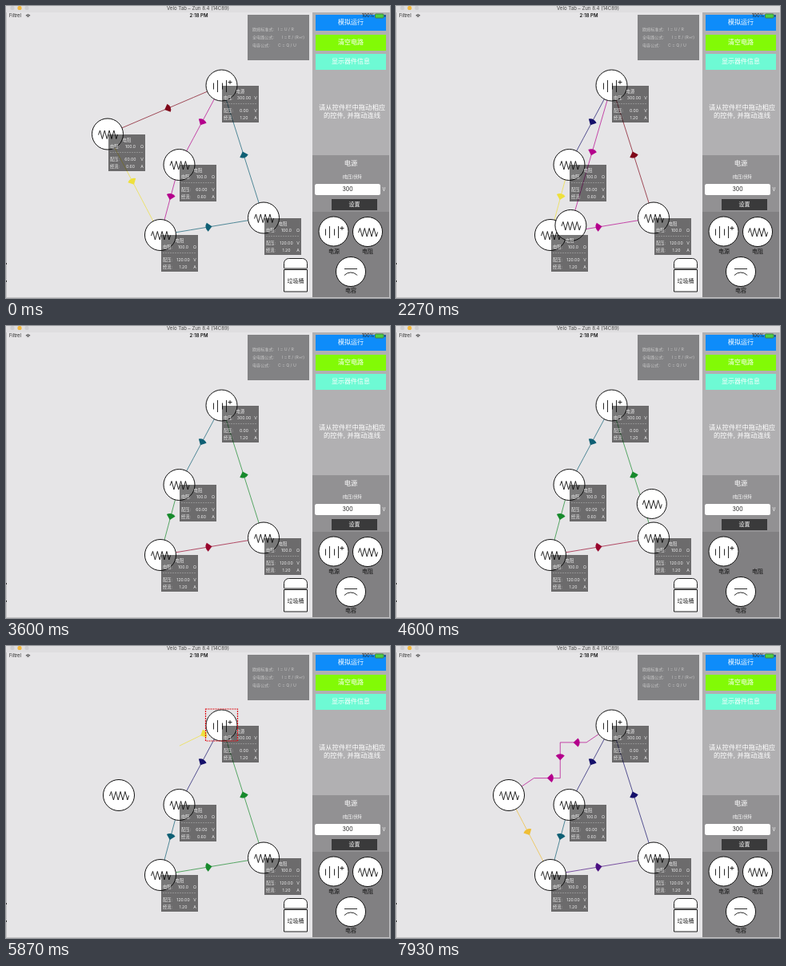
An HTML page with a canvas that plays this animation: 480x366 px, repeating every 8 s.

```html
<!DOCTYPE html>
<html lang="zh">
<head>
<meta charset="utf-8">
<title>Circuit board</title>
<style>
html, body { margin: 0; width: 100%; height: 100%; overflow: hidden; background: #e6e5e7; }
canvas { display: block; width: 480px; height: 366px; }
</style>
</head>
<body>
<canvas id="stage"></canvas>
<script>
const LOOP = 8000;
const FONT = 'Inter, "Noto Sans CJK SC", "Noto Sans CJK", sans-serif';
const canvas = document.getElementById('stage');
const ctx = canvas.getContext('2d');
const scale = window.devicePixelRatio || 1;
canvas.width = 480 * scale;
canvas.height = 366 * scale;

const C = {
  teal: '#0f5f74', magenta: '#b4008c', yellow: '#eee03c', maroon: '#80081a',
  lime: '#a8c814', green: '#178a2c', crimson: '#98062c', navy: '#15106a',
  purple: '#4a1082', sea: '#12907e', amber: '#efbe36'
};
const hues = Object.values(C);

const cell = { x: 269.5, y: 99.5, kind: 'cell', info: ['电源', '电压:', '300.00', 'V', '0.00', '1.20'] };
const resistor = (x, y, volts, amps) =>
  ({ x, y, kind: 'resistor', info: ['电阻', '电阻:', '100.0', 'Ω', volts, amps] });
const left = resistor(127, 160.5, '60.00', '0.60');
const mid = resistor(216.5, 199, '60.00', '0.60');
const low = resistor(193, 287, '120.00', '1.20');
const right = resistor(322, 265.5, '120.00', '1.20');
const HOME = { x: 452, y: 283 };
const DROP = { x: 141, y: 187 };

// Start time, then colours of cell-right, right-low, low-mid, mid-cell, low-loose, loose-cell
const phases = [
  [0, 'teal teal magenta magenta yellow maroon'],
  [2660, 'teal lime magenta green magenta magenta'],
  [2870, 'green crimson green teal'],
  [5600, 'green green teal navy'],
  [6370, 'maroon navy purple sea amber magenta'],
  [7500, 'navy purple teal navy amber magenta']
];
const oldPath = [[1700, left.x, left.y], [1900, 114, 176], [2200, 190, 262], [2600, 350, 335]];
const newPath = [[3870, HOME.x, HOME.y], [4600, 320, 223], [5400, DROP.x, DROP.y]];
const wirePath = [[5640, cell.x, cell.y], [5870, 217, 125], [6370, DROP.x, DROP.y]];
const nextPath = [[6750, DROP.x, DROP.y], [7500, low.x, low.y]];

const during = (t, a, b) => t >= a && t < b;
const mix = (a, b, k) => a + (b - a) * k;
const noise = n => { const v = Math.sin(n * 127.1) * 43758.5453; return v - Math.floor(v); };

function along(path, t) {
  let i = 0;
  while (i < path.length - 2 && t > path[i + 1][0]) i++;
  const a = path[i], b = path[i + 1];
  const k = Math.min(1, Math.max(0, (t - a[0]) / (b[0] - a[0])));
  return { x: mix(a[1], b[1], k), y: mix(a[2], b[2], k) };
}

function text(str, x, y, size, color, align = 'center', weight = 400) {
  ctx.font = `${weight} ${size}px ${FONT}`;
  ctx.fillStyle = color;
  ctx.textAlign = align;
  ctx.textBaseline = 'middle';
  ctx.fillText(str, x, y);
}

function rect(x, y, w, h, color) {
  ctx.fillStyle = color;
  ctx.fillRect(x, y, w, h);
}

function round(x, y, w, h, r, fill, stroke) {
  ctx.beginPath();
  ctx.roundRect(x, y, w, h, r);
  ctx.fillStyle = fill;
  ctx.fill();
  if (stroke) { ctx.strokeStyle = stroke; ctx.lineWidth = 1; ctx.stroke(); }
}

function line(points, color = '#111', width = 0.9) {
  ctx.beginPath();
  points.forEach(([x, y]) => ctx.lineTo(x, y));
  ctx.strokeStyle = color;
  ctx.lineWidth = width;
  ctx.stroke();
}

function disc(x, y, r, color) {
  ctx.beginPath();
  ctx.arc(x, y, r, 0, 7);
  ctx.fillStyle = color;
  ctx.fill();
}

const glyphs = {
  cell() {
    [-10, -5, 1, 6].forEach((x, i) => {
      const h = i % 2 ? 7.5 : 4;
      line([[x, 1 - h], [x, 1 + h]]);
    });
    line([[8, -4], [13, -4]]);
    line([[10.5, -6.5], [10.5, -1.5]]);
  },
  resistor() {
    const points = [[-11.5, 1]];
    for (let i = 0; i < 8; i++) points.push([-9.5 + i * 2.9, i % 2 ? 6 : -4.5]);
    line([...points, [12.5, 0.5]]);
  },
  capacitor() {
    line([[-8, -3.5], [8, -3.5]]);
    ctx.beginPath();
    ctx.arc(0, 12, 11, -2.4, -0.74);
    ctx.stroke();
  }
};

function part(x, y, kind, r = 19.5) {
  ctx.save();
  ctx.translate(x, y);
  disc(0, 0, r, '#fff');
  ctx.strokeStyle = '#111';
  ctx.lineWidth = 1;
  ctx.stroke();
  glyphs[kind]();
  ctx.restore();
}

function infoBox({ x, y, info }) {
  const [name, label, value, unit, volts, amps] = info;
  ctx.save();
  ctx.translate(Math.round(x + 0.5), Math.round(y));
  rect(0, 0, 46, 46, 'rgba(0,0,0,.53)');
  text(name, 23, 7.5, 5.4, '#eee');
  const row = (a, b, c, dy) => {
    text(a, 2, dy, 5.2, '#eee', 'left');
    text(b, 27.5, dy, 5.2, '#eee');
    text(c, 42, dy, 5.2, '#eee');
  };
  row(label, value, unit, 15);
  ctx.setLineDash([2, 1]);
  line([[2, 22.5], [44, 22.5]], '#aaa', 0.6);
  ctx.setLineDash([]);
  row('配压:', volts, 'V', 31.5);
  row('经流:', amps, 'A', 40);
  ctx.restore();
}

// Sector with its tip halfway, opening towards b
function fan([ax, ay], [bx, by], color) {
  const x = (ax + bx) / 2, y = (ay + by) / 2;
  const turn = Math.atan2(by - ay, bx - ax);
  ctx.beginPath();
  ctx.moveTo(x, y);
  ctx.arc(x, y, 8, turn - 0.76, turn + 0.76);
  ctx.closePath();
  ctx.fillStyle = color;
  ctx.fill();
}

// Straight when nearly level or upright, otherwise stepped; both ends have a fan under the part
function wire(a, b, color) {
  const dx = b.x - a.x, dy = b.y - a.y;
  const len = Math.hypot(dx, dy) || 1;
  const ux = dx / len * 38, uy = dy / len * 38;
  const start = [a.x, a.y], end = [b.x, b.y];
  const first = [a.x + ux, a.y + uy], last = [b.x - ux, b.y - uy];
  const mx = (a.x + b.x) / 2;
  const stepped = Math.min(Math.abs(dx), Math.abs(dy)) >= 75;
  const run = stepped ? [first, [mx, first[1]], [mx, last[1]], last] : [first, last];
  line([start, ...run, end], color, 0.7);
  fan(first, start, color);
  fan(last, end, color);
  for (let i = 1; i < run.length; i++) fan(run[i - 1], run[i], color);
}

function dragWire(from, to) {
  line([[from.x, from.y], [to.x, to.y]], C.yellow, 0.7);
  if (Math.hypot(to.x - from.x, to.y - from.y) > 16) fan([to.x, to.y], [from.x, from.y], C.yellow);
}

function highlight({ x, y }) {
  ctx.setLineDash([2, 1]);
  ctx.strokeStyle = '#e01018';
  ctx.lineWidth = 1.2;
  ctx.strokeRect(x - 20, y - 20.5, 40, 40);
  ctx.setLineDash([]);
}

function bin(open) {
  ctx.save();
  ctx.translate(362, 323 + open * 2);
  ctx.rotate(open * 0.22);
  round(-14.5, -6.5, 29, 12.5, [6, 6, 1, 1], '#fff', '#222');
  ctx.restore();
  round(347.5, 330.5, 29, 27.5, 0, '#fff', '#222');
  text('垃圾桶', 362, 344.5, 7, '#222');
}

function chrome() {
  rect(0, 0, 480, 366, '#c4c3c5');
  rect(1, 8, 478, 357, '#e6e5e7');
  rect(0, 0, 480, 8, '#dfdee0');
  ['#cfced0', '#f2b63c', '#cfced0'].forEach((c, i) => disc(8 + i * 9, 2.5, 2.6, c));
  text('Velo Tab – Zun 8.4 (14C89)', 240, 3, 6.1, '#444');
  rect(0, 322, 1, 2, '#333');
  rect(0, 344, 1, 2, '#333');
  text('Filtrel', 4, 12.5, 5.7, '#222', 'left');
  ctx.strokeStyle = '#222';
  ctx.lineWidth = 0.8;
  for (const r of [1, 2.4, 3.8]) {
    ctx.beginPath();
    ctx.arc(27.5, 14.6, r, -2.36, -0.78);
    ctx.stroke();
  }
  text('2:18 PM', 241, 12.5, 6, '#111', 'center', 600);
  rect(302, 11, 77, 57, '#828284');
  const formula = (name, expr, x, y) => {
    text(name, 308, y, 5.1, '#c6c6c6', 'left');
    text(expr, x, y, 5.2, '#c6c6c6', 'left');
  };
  formula('欧姆标准式:', 'I = U / R', 340, 29.5);
  formula('全电路公式:', 'I = E / (R+r)', 345, 39.5);
  formula('电容公式:', 'C = Q / U', 340, 49);
}

function panel(held) {
  rect(383, 8, 96, 179, '#b1b0b2');
  rect(383, 187, 96, 71, '#929193');
  rect(383, 258, 96, 107, '#818082');
  [['模拟运行', 11, '#0e8cfa'], ['清空电路', 36, '#82fa06'], ['显示器件信息', 60, '#6efad4']]
    .forEach(([label, y, color]) => {
      rect(387, y, 88, 20, color);
      text(label, 431, y + 10, 8, '#fff');
    });
  text('100%', 445, 12.5, 5.7, '#222', 'left');
  round(461.5, 10, 10.5, 5, 1, '#4cd040', '#4a7a44');
  rect(473, 11.5, 1.5, 2, '#333');

  text('请从控件栏中拖动相应', 432.5, 128, 8.3, '#fff');
  text('的控件, 并拖动连线', 432.5, 138, 8.3, '#fff');
  text('电源', 431, 197.5, 8.2, '#fff');
  text('(电压)伏特', 432.5, 214, 5.2, '#fff');
  round(386, 223, 82, 14, 2.5, '#fff');
  text('300', 427, 230, 7, '#222');
  text('V', 472.5, 230, 5.6, '#fff');
  rect(407, 242, 57, 14, '#3a3a3b');
  text('设置', 435.5, 249, 7, '#fff');

  part(409.5, 282.5, 'cell', 18.5);
  if (!held) part(HOME.x, HOME.y, 'resistor', 18.5);
  part(431, 333, 'capacitor', 18.5);
  text('电源', 410, 307.5, 7, '#111');
  text('电阻', 452, 307.5, 7, '#111');
  text('电容', 431, 357, 7, '#111');
}

function colours(t) {
  if (during(t, 1700, 2660)) {
    const step = Math.floor(t / 134);
    return [0, 1, 2, 3, 4, 5].map(i => hues[Math.floor(noise(step * 6 + i) * hues.length)]);
  }
  const phase = phases.filter(p => p[0] <= t).pop();
  return phase[1].split(' ').map(name => C[name]);
}

function draw(t) {
  ctx.setTransform(scale, 0, 0, scale, 0, 0);
  chrome();
  const old = t < 2870;
  const held = during(t, 3800, 5450);
  const loose = old ? along(oldPath, t) : along(newPath, t);
  const dropping = during(t, 2520, 2870);
  panel(held);

  const c = colours(t);
  wire(cell, right, c[0]);
  wire(right, low, c[1]);
  wire(low, mid, c[2]);
  wire(mid, cell, c[3]);
  if (old || t >= 7500) wire(low, loose, c[4]);
  if (old || t >= 6370) wire(loose, cell, c[5]);
  if (during(t, 5640, 6370)) dragWire(cell, along(wirePath, t));
  if (during(t, 6750, 7500)) dragWire(DROP, along(nextPath, t));

  const fixed = [cell, mid, low, right];
  fixed.forEach(p => part(p.x, p.y, p.kind));
  bin(dropping ? 1 : 0);
  if (old || t >= 3870) {
    ctx.globalAlpha = dropping ? 0.45 : 1;
    part(loose.x, loose.y, 'resistor', old || t >= 5450 ? 19.5 : 18.5);
    ctx.globalAlpha = 1;
  }
  fixed.forEach(infoBox);
  if (t < 1700) infoBox(left);
  if (during(t, 5600, 6370)) highlight(cell);
  if (during(t, 6500, 7500)) highlight(DROP);
}

function tick() {
  draw(performance.now() % LOOP);
  requestAnimationFrame(tick);
}
tick();
</script>
</body>
</html>
```
